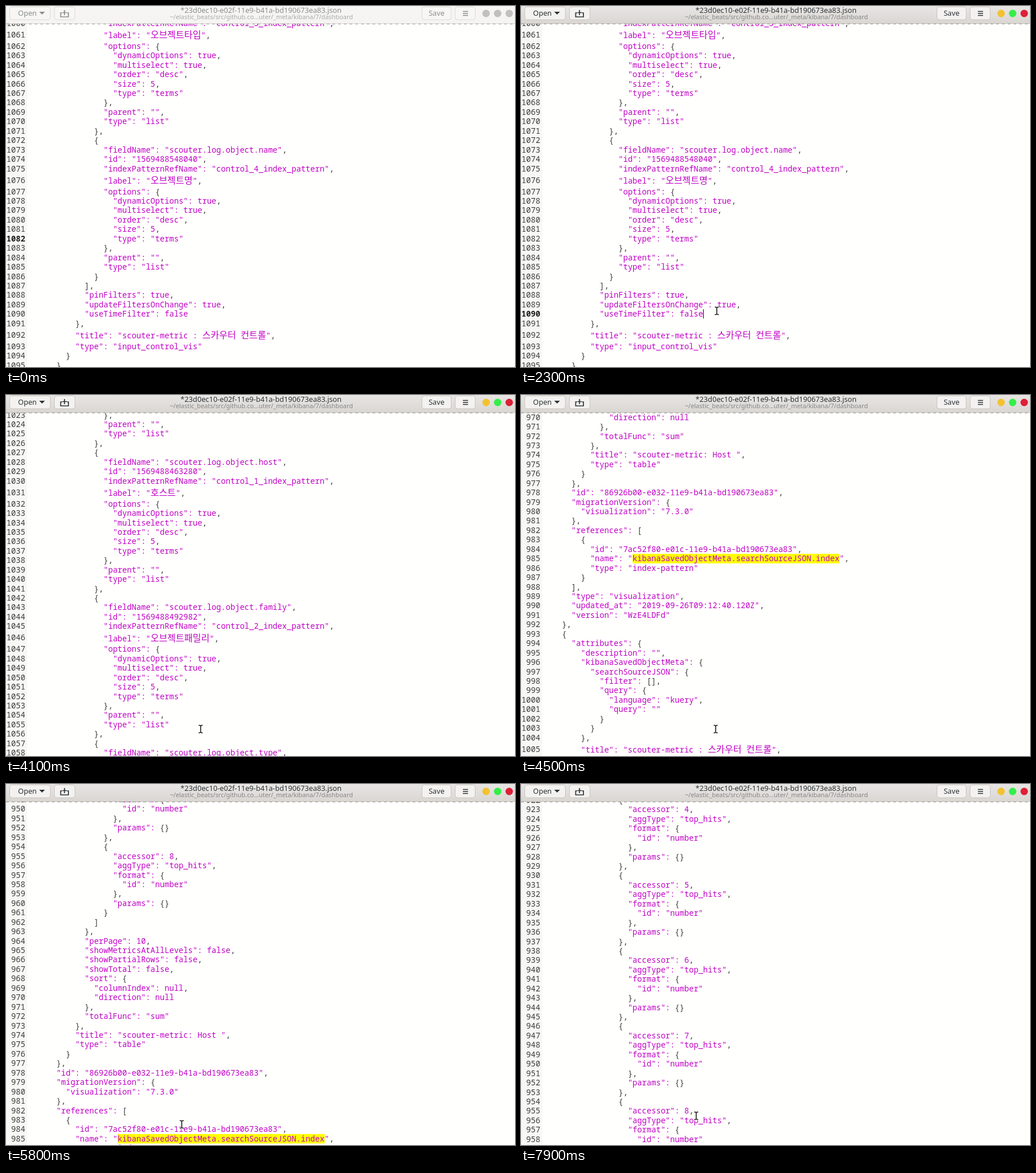
Animation, 889 px wide and 630 px high, one loop 8 s. Source, as an HTML page with a canvas:

```html
<!DOCTYPE html>
<html lang="en">
<head>
<meta charset="utf-8">
<title>JSON editor</title>
<style>
  html, body { margin: 0; width: 100%; height: 100%; overflow: hidden; background: #fffffd; }
  canvas { display: block; }
</style>
</head>
<body>
<canvas id="stage" width="889" height="630"></canvas>
<script>
const ctx = document.getElementById('stage').getContext('2d');
const W = 889, H = 630, LOOP = 8000;
const CHAR = 8.22, LINE = 16.44, TALL_EXTRA = 7.1, TEXT_X = 38.7, HEADER = 31;
const MONO = '500 13.7px "Noto Sans Mono", monospace';
const MONO_BOLD = '700 13.7px "Noto Sans Mono", monospace';
const HANGUL = '16px "Noto Sans CJK KR", "Noto Sans CJK JP", sans-serif';
const UI = '12.7px "Noto Sans", sans-serif';
const UI_SMALL = '10.9px "Noto Sans", sans-serif';
const MATCH = 'kibanaSavedObjectMeta.searchSourceJSON.index';

// ---- Document ----
const metric = accessor => ({ accessor, aggType: 'top_hits', format: { id: 'number' }, params: {} });

const control = ([field, id, label], i) => ({
  fieldName: 'scouter.log.object.' + field,
  id,
  indexPatternRefName: `control_${i}_index_pattern`,
  label,
  options: { dynamicOptions: true, multiselect: true, order: 'desc', size: 5, type: 'terms' },
  parent: '',
  type: 'list'
});

const tableVis = {
  attributes: {
    visState: {
      params: {
        dimensions: { metrics: [1, 2, 3, 4, 5, 6, 7, 8].map(metric) },
        perPage: 10,
        showMetricsAtAllLevels: false,
        showPartialRows: false,
        showTotal: false,
        sort: { columnIndex: null, direction: null },
        totalFunc: 'sum'
      },
      title: 'scouter-metric: Host ',
      type: 'table'
    }
  },
  id: '86926b00-e032-11e9-b41a-bd190673ea83',
  migrationVersion: { visualization: '7.3.0' },
  references: [{ id: '7ac52f80-e01c-11e9-b41a-bd190673ea83', name: MATCH, type: 'index-pattern' }],
  type: 'visualization',
  updated_at: '2019-09-26T09:12:40.120Z',
  version: 'WzE4LDFd'
};

const controlTitle = 'scouter-metric : 스카우터 컨트롤';
const controlVis = {
  attributes: {
    description: '',
    kibanaSavedObjectMeta: {
      searchSourceJSON: { filter: [], query: { language: 'kuery', query: '' } }
    },
    title: controlTitle,
    uiStateJSON: {},
    version: 1,
    visState: {
      aggs: [],
      params: {
        controls: [
          ['hash', '1569488431754', '오브젝트'],
          ['host', '1569488463280', '호스트'],
          ['family', '1569488492982', '오브젝트패밀리'],
          ['type', '1569488521516', '오브젝트타입'],
          ['name', '1569488548040', '오브젝트명']
        ].map(control),
        pinFilters: true,
        updateFiltersOnChange: true,
        useTimeFilter: false
      },
      title: controlTitle,
      type: 'input_control_vis'
    }
  },
  id: 'a1c0de40-e033-11e9-b41a-bd190673ea83'
};

const source = JSON.stringify({ objects: [tableVis, controlVis] }, null, 2).split('\n');
const ANCHOR = 964;
const anchorIndex = source.findIndex(s => s.includes('"perPage"'));
let nextTop = 0;
const lines = source.map((text, i) => {
  const tall = /[가-힣]/.test(text);
  const [, indent, body, tail] = text.match(/^(\s*)(.*?)([{}\[\],]*)$/);
  const line = { number: ANCHOR + i - anchorIndex, top: nextTop, tall, indent: indent.length, body, tail };
  nextTop += LINE + (tall ? TALL_EXTRA : 0);
  return line;
});

// ---- Timeline ----
const CLICK = 2000, CURSOR_IN = 800, NOTCH = 111.2;

// [time, wheel notches from the anchor view]
const scrolls = [
  [0, -18.64], [2700, -18], [2900, -17], [3100, -16], [3300, -15], [3400, -14],
  [3900, -13], [4200, -11], [4400, -8], [4500, -5], [4800, -3], [4900, 0],
  [5200, -1], [5300, -2], [6600, -1], [7000, 1], [7900, 2]
];

// [first step, last step, x, y]
const moves = [
  [800, 1100, 302, 586], [1300, 1400, 316, 558], [1700, 2200, 342, 532],
  [2600, 3100, 338, 584], [3900, 4100, 340, 583], [4800, 4900, 342, 564],
  [5200, 5400, 338, 590], [5600, 5800, 307, 594], [5900, 6200, 306, 585],
  [6400, 6400, 306, 580], [7900, 7900, 306, 579]
];

const clamp = v => Math.max(0, Math.min(1, v));
const anchorY = t => 496 + NOTCH * scrolls.filter(s => s[0] <= t).pop()[1];

function pointer(t) {
  let x = 234, y = 636;
  for (const [from, to, toX, toY] of moves) {
    const p = clamp((t - from + 100) / (to - from + 100));
    x += (toX - x) * p;
    y += (toY - y) * p;
  }
  return [x, y];
}

// ---- Drawing ----
function label(text, x, y, font, color, align = 'left') {
  ctx.font = font;
  ctx.fillStyle = color;
  ctx.textAlign = align;
  ctx.fillText(text, x, y);
}

function rect(x, y, w, h, color) {
  ctx.fillStyle = color;
  ctx.fillRect(x, y, w, h);
}

function stroke(path, color, width) {
  ctx.strokeStyle = color;
  ctx.lineWidth = width;
  ctx.stroke(new Path2D(path));
}

function drawLine(line, y, current) {
  const numberY = y + 5 + (line.tall ? TALL_EXTRA / 2 : 0);
  const baseline = y + 5 + (line.tall ? 4.9 : 0);
  label(line.number, 33.6, numberY, current ? MONO_BOLD : MONO, current ? '#1c1c1c' : '#3c3c3c', 'right');

  let x = TEXT_X + line.indent * CHAR;
  const match = line.body.indexOf(MATCH);
  if (match >= 0) rect(x + match * CHAR, y - 8, MATCH.length * CHAR, 16.5, '#ffff00');
  for (const run of line.body.split(/([가-힣]+)/)) {
    const hangul = /[가-힣]/.test(run);
    label(run, x, baseline, hangul ? HANGUL : MONO, '#c000c6');
    x += hangul ? ctx.measureText(run).width : run.length * CHAR;
  }
  label(line.tail, x, baseline, MONO, '#3a3a3a');
  return x;
}

function drawEditor(t) {
  rect(0, 0, W, H, '#fffffd');
  rect(0, 0, 37, H, '#f7f7f5');
  const currentLine = t < CLICK ? 1082 : 1090;
  const offset = anchorY(t) - lines[anchorIndex].top;
  for (const line of lines) {
    const y = line.top + offset;
    if (y < 0 || y > H + 12) continue;
    const current = line.number === currentLine;
    const end = drawLine(line, y, current);
    if (current && t >= CLICK) rect(Math.round(end), y - 8, 1, 16, '#000');
  }
}

function button(x, w, active) {
  ctx.beginPath();
  ctx.roundRect(x + 0.5, 1.5, w - 1, 22.5, 4);
  ctx.fillStyle = active ? '#f3f2f0' : '#f7f6f5';
  ctx.fill();
  ctx.strokeStyle = active ? '#c8c3bd' : '#dcd9d5';
  ctx.lineWidth = 1;
  ctx.stroke();
}

function drawHeader(active) {
  const ink = active ? '#2e3436' : '#8b8e8f';
  const fill = ctx.createLinearGradient(0, 0, 0, HEADER);
  fill.addColorStop(0, active ? '#e8e6e4' : '#f6f5f3');
  fill.addColorStop(1, active ? '#d9d6d2' : '#f5f4f2');
  rect(0, 0, W, HEADER, fill);
  rect(0, HEADER - 1, W, 1, active ? '#c4bfb9' : '#dedad6');

  label('*23d0ec10-e02f-11e9-b41a-bd190673ea83.json', 445.5, 11.5, UI, ink, 'center');
  label('~/elastic_beats/src/github.co...uter/_meta/kibana/7/dashboard', 446, 22.5, UI_SMALL,
    active ? '#858687' : '#a9abab', 'center');

  [[6, 72], [84, 37], [726, 52], [784, 36]].forEach(([x, w]) => button(x, w, active));
  label('Open', 21, 17, UI, ink);
  label('Save', 752, 17, UI, ink, 'center');
  ctx.fill(new Path2D('M58 10H68L63 15Z'));
  stroke('M98 12H95.5V19H109V12H106.5M102.2 7V16M98.5 11.5H106', ink, 1.7);
  stroke('M798 9.5H807M798 13H807M798 16.5H807', ink, 1.7);

  const lights = active ? ['#f2c230', '#35ee49', '#dd2038'] : ['#c0c0bf', '#c0c0bf', '#c0c0bf'];
  lights.forEach((color, i) => {
    ctx.fillStyle = color;
    ctx.beginPath();
    ctx.arc(838.5 + i * 20.2, 13, 6.5, 0, Math.PI * 2);
    ctx.fill();
  });
}

function drawPointer(x, y) {
  const beam = 'M-3.5 -6.5H-1.5L0 -5.5L1.5 -6.5H3.5M0 -5.5V5.5M-3.5 6.5H-1.5L0 5.5L1.5 6.5H3.5';
  ctx.save();
  ctx.translate(x, y);
  stroke(beam, '#fff', 3.4);
  stroke(beam, '#111', 1.5);
  ctx.restore();
}

function draw(time) {
  const t = Math.floor(time / 100) * 100;
  drawEditor(t);
  drawHeader(false);
  ctx.globalAlpha = clamp((t - CLICK + 100) / 300);
  drawHeader(true);
  ctx.globalAlpha = 1;
  ctx.setLineDash([5, 5]);
  stroke('M0 31.5H889', '#a9a9a7', 1);
  ctx.setLineDash([]);
  if (t >= CURSOR_IN) drawPointer(...pointer(t));
}

const startTime = performance.now();
function tick() {
  draw((performance.now() - startTime) % LOOP);
  requestAnimationFrame(tick);
}
tick();
</script>
</body>
</html>
```
